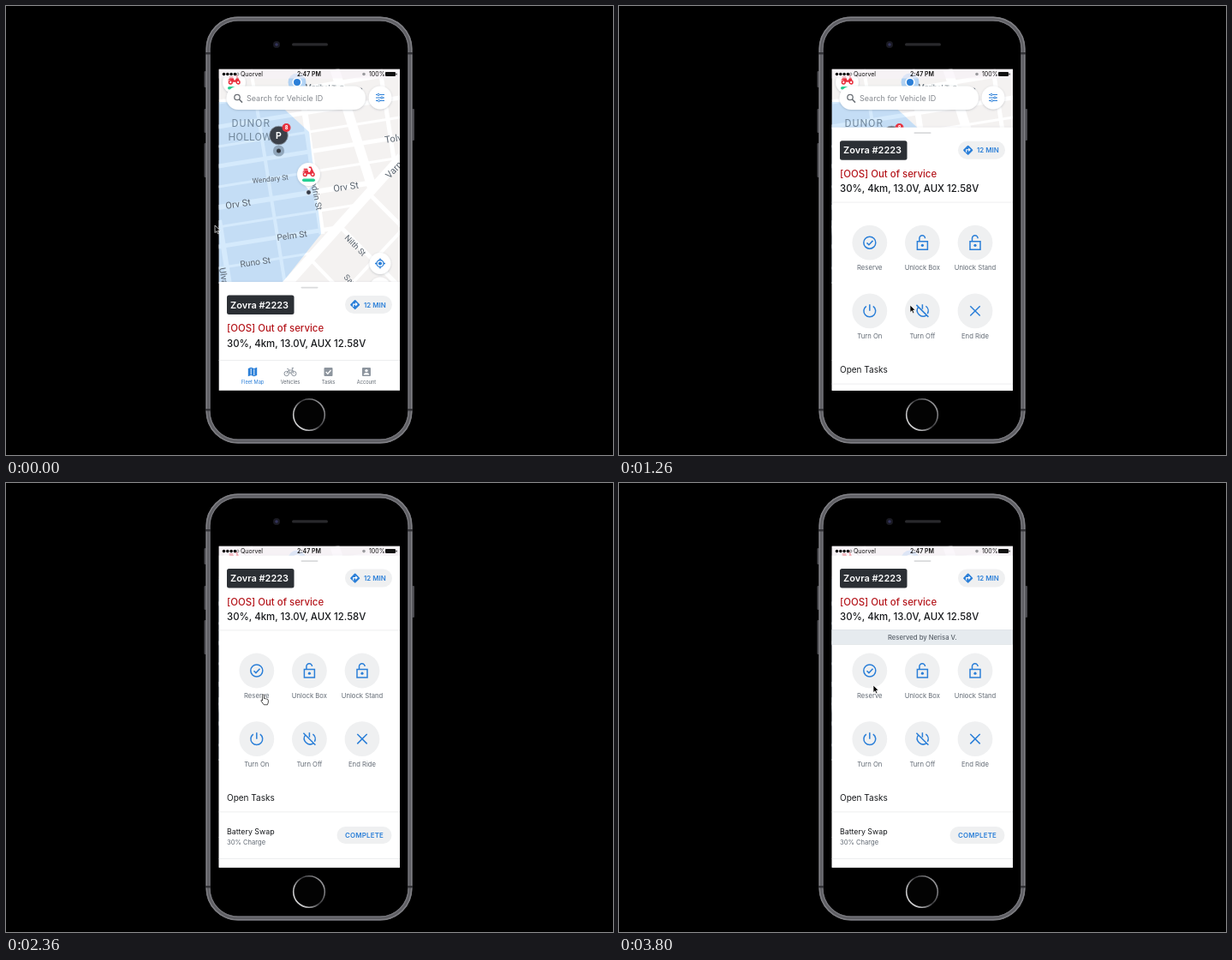
Animation of 709x524 px, one loop 4320 ms. Source, as an HTML page:

```html
<!DOCTYPE html>
<html lang="en">
<head>
<meta charset="utf-8">
<title>Fleet app</title>
<style>
  html, body { margin: 0; width: 100%; height: 100%; overflow: hidden; background: #000; }
  svg { display: block; width: 709px; height: 524px; }
  text { font-family: Inter, sans-serif; }
  .map text { font-family: Roboto, sans-serif; }
</style>
</head>
<body>
<svg id="stage" viewBox="0 0 709 524"></svg>
<script>
const LOOP = 4320;
const BLUE = '#2b7fd8', GREY = '#626a74', INK = '#17191c';

// ---- drawing helpers ----
const text = (x, y, s, size, fill, weight = 400, more = '') =>
  `<text x="${x}" y="${y}" font-size="${size}" fill="${fill}" font-weight="${weight}" ${more}>${s}</text>`;
const mid = 'text-anchor="middle"';
const rect = (x, y, w, h, fill, r = 0, more = '') =>
  `<rect x="${x}" y="${y}" width="${w}" height="${h}" rx="${r}" fill="${fill}" ${more}/>`;
const disc = (x, y, r, fill, more = '') => `<circle cx="${x}" cy="${y}" r="${r}" fill="${fill}" ${more}/>`;
const line = (d, stroke, w, more = '') =>
  `<path d="${d}" fill="none" stroke="${stroke}" stroke-width="${w}" ${more}/>`;
const at = (x, y, body, more = '') => `<g transform="translate(${x} ${y}) ${more}">${body}</g>`;
const rule = y => rect(248, y, 212, 0.8, '#e9eaec');

// ---- phone ----
function phone() {
  const edge = (inset, color, w) =>
    rect(233 + inset, 12 + inset, 242 - 2 * inset, 499 - 2 * inset, 'none', 38 - inset,
      `stroke="${color}" stroke-width="${w}"`);
  const bands = [54, 470].map(y => rect(233, y, 6, 2.5, '#333337') + rect(469, y, 6, 2.5, '#333337')).join('');
  const keys = [[231.5, 76, 19], [231.5, 120, 28], [231.5, 160, 40], [474.5, 120, 37]]
    .map(([x, y, h]) => rect(x, y, 2.5, h, '#4b4b50', 1)).join('');
  return keys + edge(3, '#5f5f64', 5) + edge(1.2, '#808085', 1.5) + edge(4.9, '#76767b', 1.3) + bands +
    disc(316, 45, 4, '#1a1a22') + disc(316, 45, 1.8, '#33345c') +
    rect(334, 43.2, 42, 3.4, '#29292c', 1.7) +
    disc(354, 477, 18.3, '#030303', 'stroke="url(#ring)" stroke-width="1.6"');
}

// ---- map ----
const label = (x, y, deg, s, size) =>
  at(x, y, text(0, 0, s, size, '#5a646f'), `rotate(${deg})`);

function scooter(x, y) {
  const wheel = cx => disc(cx, 3, 1.9, 'none', 'stroke="#e8303f" stroke-width="1.5"');
  return at(x, y, wheel(-4.2) + wheel(4.6) +
    '<path d="M-7 1.6q0-3.6 3-3.6h3.2l.6 2.4h1.6l1.5-3.5-1-1.5h-1.6v-1.4h2.7l3 6.2-3.2 2.6h-5.3q-1-3-3.3-3z" fill="#e8303f"/>' +
    rect(-6, -3.8, 5, 1.5, '#e8303f', 0.7));
}

function vehicle(x, y) {
  return at(x, y,
    '<path d="M-6 11l6 7 6-7z" fill="#fff"/>' + disc(0, 0, 13.4, '#fff', 'filter="url(#soft)"') +
    rect(-7.5, 5, 15, 3.6, '#25cf92', 1.8)) + scooter(x, y - 3);
}

function map() {
  const roads = list => list.map(([d, w]) => line(d, '#fff', w)).join('');
  const across = [[141, 5], [164, 3], [187, 5], [211, 3], [235, 6], [258, 3], [281, 5], [306, 3]]
    .map(([y, w]) => [`M248 ${y}L460 ${y - 34}`, w]);
  const grid = roads([...across, ['M249 250L261 325', 6], ['M286 74L326 325', 4], ['M342 74L369 266', 7],
    ['M384 74L432 226', 11], ['M437 74L454 185', 5], ['M249 112L460 78', 5]]);
  return rect(248, 73, 212, 251, '#f4f2f1') + grid +
    '<path d="M248 112H316L354 147 368 266 322 324H248z" fill="#95cafa" opacity=".5"/>' +
    `<g clip-path="url(#zone)" opacity=".22">${grid}</g>` +
    '<path d="M329 324L462 176V326z" fill="#f4f2f1"/>' +
    roads([['M389 256L458 326', 5], ['M424 219L462 257', 5], ['M356 296L385 326', 4],
           ['M402 326L462 262', 4], ['M327 326L462 176', 11]]) +
    text(263.5, 141, 'DUNOR', 12.2, '#748a9e', 400, 'letter-spacing="1"') +
    text(259.5, 157, 'HOLLOW', 12.2, '#748a9e', 400, 'letter-spacing=".3"') +
    label(349, 97, 3, 'Maribel T. Corvan', 8.8) +
    label(257, 237, -9, 'Orv St', 11) + label(383, 217, -9, 'Orv St', 11) +
    label(288, 207, -6, 'Wendary St', 8.4) + label(317, 274, -8, 'Pelm St', 10.3) +
    label(274, 305, -8, 'Runo St', 10.3) + label(443, 160, -9, 'Tolven', 11) +
    label(448, 202, -47, 'Varnel', 11) + label(395, 271, 45, 'Nilth St', 9.4) +
    label(394, 317, 45, 'Sarn St', 9.4) +
    label(356, 205, 79, 'odrin St', 10) + label(249, 306, 80, 'Ulvana', 10.5) +
    disc(340, 89, 10.5, '#8ec1f3', 'opacity=".65"') +
    disc(340, 89, 4.8, BLUE, 'stroke="#fff" stroke-width="1.6"') +
    disc(318.5, 169, 6.6, '#7f95a8', 'opacity=".75"') + disc(318.5, 169, 2.5, '#30363f') +
    disc(318.5, 151, 10.8, '#3b4049', 'stroke="#8d9aa7" stroke-width=".8"') +
    text(318.5, 154.8, 'P', 10.5, '#fff', 700, mid) +
    disc(327.5, 142, 5, '#e8323f') + text(327.5, 144.4, '8', 6.5, '#fff', 600, mid) +
    disc(353.5, 217.5, 2.7, '#333a48', 'stroke="#fff" stroke-width=".5"') +
    vehicle(353.5, 196.5) + vehicle(266.5, 89);
}

function controls() {
  const round = (x, y, r) => disc(x, y, r, '#fff', 'filter="url(#soft)"');
  const sliders = [[-3.5, -2], [0, 2], [3.5, -1.5]].map(([y, k]) =>
    line(`M-5 ${y}H5`, BLUE, 1) + disc(k, y, 1.2, '#fff', `stroke="${BLUE}" stroke-width=".9"`)).join('');
  return rect(257.5, 93.5, 162.5, 27.5, '#fff', 13.7, 'filter="url(#soft)"') +
    disc(270, 106.5, 3.2, 'none', 'stroke="#6c7177" stroke-width="1.3"') +
    line('M272.4 109L276 112.6', '#6c7177', 1.5) +
    text(281, 110.5, 'Search for Vehicle ID', 9, '#85898f') +
    round(437, 107, 13.5) + at(437, 107, sliders) +
    round(437, 329, 12.5) + round(437, 300.5, 12.5) +
    at(437, 300.5, disc(0, 0, 4, 'none', `stroke="${BLUE}" stroke-width="1.3"`) + disc(0, 0, 2.1, BLUE) +
      line('M0-6V-4M0 4V6M-6 0H-4M4 0H6', BLUE, 1.3));
}

function statusBar() {
  const dots = [0, 1, 2, 3].map(i => disc(254.5 + i * 4.3, 79.5, 1.8, '#111')).join('');
  return rect(248, 73, 212, 11.5, '#f8f2f8', 0, 'opacity=".62"') + dots +
    disc(270.7, 79.5, 1.3, 'none', 'stroke="#111" stroke-width=".5"') +
    text(274, 82.2, 'Quorvel', 7, '#111') + text(354, 82.2, '2:47 PM', 7, '#111', 600, mid) +
    disc(418, 79.5, 1.8, '#9a9a9e') + text(424, 82.2, '100%', 7, '#111') +
    rect(443, 77, 12, 5, '#111', 1) + rect(455.5, 78.5, 1.2, 2, '#111', 0.5);
}

// ---- sheets ----
function head() {
  return rect(344.5, 327.7, 20, 1.7, '#d9dadc', 0.8) +
    rect(258, 337.5, 78.5, 22.5, '#2b2f34', 2.5) +
    text(262, 352.6, 'Zovra #2223', 11, '#fff', 600) +
    rect(396, 338, 55, 21, '#eff0f1', 10.5) +
    at(407.7, 348.6, rect(-4.2, -4.2, 8.4, 8.4, BLUE, 1, 'transform="rotate(45)"') +
      line('M-2 2.5V-.5H2M.6-2.2L2.3-.5 .6 1.2', '#fff', 1.1)) +
    text(418, 351.5, '12 MIN', 7.9, BLUE, 600) +
    text(258, 380, '[OOS] Out of service', 11.4, '#b5161c', 500) +
    text(258, 397.5, '30%, 4km, 13.0V, AUX 12.58V', 11.4, INK, 500);
}

function tabs() {
  const tab = (x, name, color, icon) =>
    at(x, 427, icon) + text(x, 440.5, name, 5.7, color, 400, mid);
  const mapIcon = `<path d="M-5.2-4L-1.8-5.2 1.8-4 5.2-5.2V4L1.8 5.2-1.8 4-5.2 5.2z" fill="${BLUE}"/>` +
    line('M-1.8-4V3.3M1.8-3.3V4', '#fff', 0.9);
  const wheel = x => disc(x, 2, 2.7, 'none', 'stroke="#8d959e"');
  const bike = wheel(-4.3) + wheel(4.3) +
    line('M-4.3 2L-1.8-2H2.8L0 2-2.2-3.5H-3.8M4.3 2L2-4.5H4', '#8d959e', 0.9);
  const tile = rect(-5, -5, 10, 10, '#8d959e', 1);
  const check = tile + line('M-2.8 0L-.7 2.2 3-2', '#fff', 1.3);
  const person = tile + disc(0, -1.4, 1.7, '#fff') +
    '<path d="M-3.3 3.5q0-2.6 3.3-2.6t3.3 2.6z" fill="#fff"/>';
  return rule(413) + tab(288, 'Fleet Map', BLUE, mapIcon) + tab(332, 'Vehicles', '#5f6770', bike) +
    tab(376.5, 'Tasks', '#5f6770', check) + tab(421, 'Account', '#5f6770', person);
}

function details() {
  const stroke = d => line(d, BLUE, 1.5);
  const lock = stroke('M-6-1.5H6V8H-6zM-3.5-1.5V-5a3.3 3.3 0 0 1 6.6 0') + disc(0, 3.2, 1.6, BLUE);
  const power = stroke('M0-7.5V0M-4-5.6A6.9 6.9 0 1 0 4-5.6');
  const off = stroke('M0-7.5V-2M-4.8-4.6A6.9 6.9 0 0 0 4.5 5.2M4-5.6A6.9 6.9 0 0 1 6 3.2M-7-7L7 7');
  const ok = disc(0, 0, 7, 'none', `stroke="${BLUE}" stroke-width="1.5"`) + stroke('M-3.3.2L-.9 2.6 3.7-2.3');
  const cross = stroke('M-5.7-5.7L5.7 5.7M5.7-5.7L-5.7 5.7');
  const actions = [['Reserve', ok], ['Unlock Box', lock], ['Unlock Stand', lock],
                   ['Turn On', power], ['Turn Off', off], ['End Ride', cross]];
  const grid = actions.map(([name, icon], i) =>
    at(292.8 + i % 3 * 61.6, i < 3 ? 219 : 298.7,
      disc(0, 0, 20.4, '#eff0f1') + icon + text(0, 32, name, 7.7, GREY, 400, mid))).join('');
  const banner = (id, bg, fg, s) => `<g id="${id}" opacity="0">` +
    rect(248, 171.5, 211.5, 17, bg) + text(354.3, 183, s, 7.7, fg, 500, mid) + '</g>';
  return rect(248, 84.5, 212, 366, '#fff', 0, 'filter="url(#soft)"') + at(0, -237.5, head()) + rule(171.5) +
    banner('pending', '#c9ced2', '#fff', 'Reserving') +
    banner('done', '#e6ebef', '#59616a', 'Reserved by Nerisa V.') +
    grid + text(258, 371, 'Open Tasks', 10, INK) + rule(383.5) +
    text(258, 409.5, 'Battery Swap', 8.8, INK) + text(258, 421.5, '30% Charge', 7.6, GREY) +
    rect(386.5, 401, 64, 20, '#eff0f1', 10) +
    text(418.5, 413.6, 'COMPLETE', 7.9, BLUE, 600, mid + ' letter-spacing=".2"') + rule(438);
}

function pointer() {
  return '<g id="cursor"><path id="arrow" d="M0 0V8.6L2 6.7 3.4 9.8 4.9 9.1 3.5 6.1H6.2z" fill="#000" stroke="#fff" stroke-width=".7"/>' +
    '<path id="hand" d="M-.9.5q0-1.3 1-1.3t1 1.3V4q1.3-.8 1.8.2 1.3-.5 1.7.5 1.4-.2 1.4 1.2V8.2L5 11H.8L-2 7.2q-.9-1.4 0-1.7t1.1.8z" fill="#fff" stroke="#222" stroke-width=".8"/></g>';
}

document.getElementById('stage').innerHTML = `<defs>
  <clipPath id="screen"><rect x="248.7" y="73.7" width="211.3" height="375"/></clipPath>
  <clipPath id="zone"><path d="M248 112H316L354 147 368 266 322 324H248z"/></clipPath>
  <filter id="soft" x="-20%" y="-20%" width="140%" height="150%">
    <feDropShadow dx="0" dy=".7" stdDeviation="1.2" flood-color="#456" flood-opacity=".3"/></filter>
  <linearGradient id="ring" x1="0" y1=".85" x2="1" y2=".15"><stop offset="0" stop-color="#e6e6e6"/>
    <stop offset=".25" stop-color="#b0b0b2"/><stop offset=".55" stop-color="#38383b"/>
    <stop offset="1" stop-color="#a8a8ab"/></linearGradient></defs>
  <rect width="709" height="524"/>` + phone() +
  '<g clip-path="url(#screen)"><g class="map">' + map() + '</g>' + controls() +
  rect(248, 322, 212, 128, '#fff', 0, 'filter="url(#soft)"') + head() + tabs() +
  '<g id="sheet">' + details() + '</g>' + statusBar() + '</g>' + pointer();

// ---- motion ----
const el = id => document.getElementById(id);
const sheet = el('sheet'), cursor = el('cursor'), arrow = el('arrow'), hand = el('hand');
const pending = el('pending'), done = el('done');

const part = (t, a, b) => Math.min(1, Math.max(0, (t - a) / (b - a)));
const smooth = p => p * p * (3 - 2 * p);
const show = (node, on) => node.setAttribute('visibility', on ? 'visible' : 'hidden');

// start, end, dx, dy of each pointer move
const moves = [[10, 380, 92, 90], [640, 780, 4, 3], [1650, 2180, -37, -92], [2190, 2560, -6, -21]];

function draw(t) {
  const p = part(t, 1098, 1359);
  sheet.setAttribute('transform', `translate(0 ${366 * (1 - p) ** 3 * (1 + 3 * p)})`);
  show(sheet, p > 0);

  let x = 244, y = 256;
  for (const [a, b, dx, dy] of moves) {
    const k = smooth(part(t, a, b));
    x += dx * k;
    y += dy * k;
  }
  cursor.setAttribute('transform', `translate(${x} ${y})`);
  const press = (t >= 330 && t < 700) || (t >= 2230 && t < 2500);
  show(hand, press);
  show(arrow, !press);

  pending.setAttribute('opacity', smooth(part(t, 2885, 3040)));
  done.setAttribute('opacity', smooth(part(t, 3565, 3770)));
}

let start;
function tick(now) {
  start ??= now;
  draw((now - start) % LOOP);
  requestAnimationFrame(tick);
}
draw(0);
requestAnimationFrame(tick);
</script>
</body>
</html>
```
